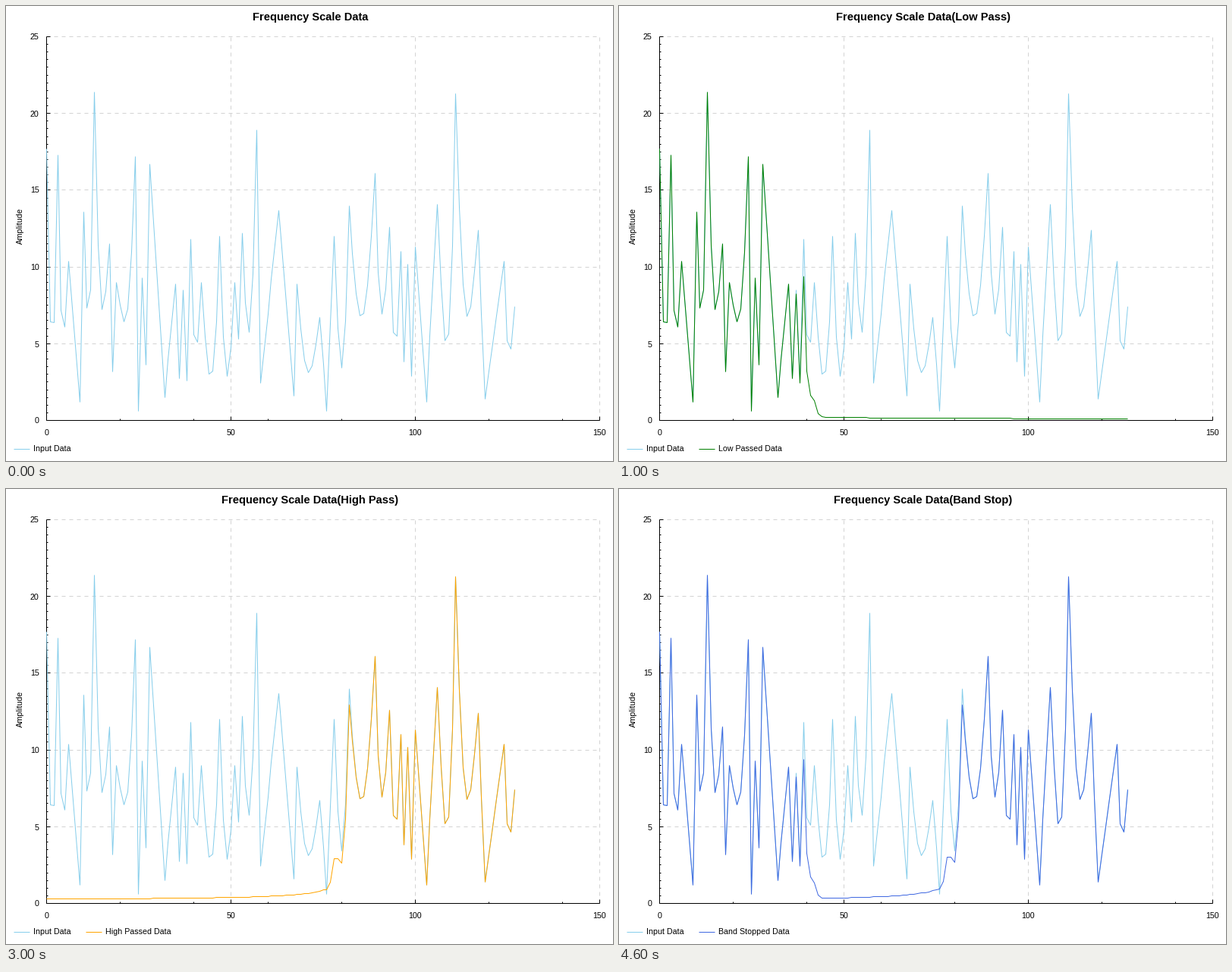
Write a matplotlib script that moves like this. It is 800x600 px and loops after 5 s.

```python
import numpy as np
import matplotlib.pyplot as plt
from matplotlib.animation import FuncAnimation

W, H, DPI = 800, 600, 100
PX = 72 / DPI
LEFT, RIGHT, TOP, BOTTOM = 53, 782, 40, 546
plt.rcParams["font.family"] = "Liberation Sans"

n = np.arange(128)
# Main peaks and dips of the spectrum
KEYS = {0: 17.7, 3: 17.3, 6: 10.4, 9: 1.2, 10: 13.6, 13: 21.4, 17: 11.5, 19: 9, 24: 17.2,
        25: .6, 26: 9.3, 28: 16.7, 32: 1.5, 35: 8.9, 37: 8.5, 39: 11.8, 42: 9, 47: 12, 51: 9,
        53: 12.2, 57: 18.9, 58: 2.4, 63: 13.7, 67: 1.6, 68: 8.9, 74: 6.7, 76: .6, 78: 12,
        82: 14, 89: 16.1, 93: 12.6, 96: 11, 98: 10.2, 100: 11.3, 103: 1.2, 106: 14.1,
        111: 21.3, 117: 12.4, 119: 1.4, 124: 10.4, 127: 7.4}


def spectrum():
    """Join the key points, with a valley of random depth between two peaks."""
    rng = np.random.default_rng(4)
    xs, ys = np.array(list(KEYS)), np.array(list(KEYS.values()))
    seg = np.clip(np.searchsorted(xs, n, "right") - 1, 0, len(xs) - 2)
    t = (n - xs[seg]) / (xs[seg + 1] - xs[seg])
    depth = rng.uniform(.45, .75, len(xs)) * (np.minimum(ys, np.roll(ys, -1)) > 5)
    return np.interp(n, xs, ys) * (1 - depth[seg] * np.sin(np.pi * t))


def rise(centre, width):
    return 1 / (1 + np.exp((centre - n) / width))


def leak(pole, scale, base):
    return base + scale / np.maximum(np.abs(n - pole), 5)


def filtered(gain, floor):
    return gain * signal + (1 - gain) * floor


signal = spectrum()
low = 1 - rise(40.2, .9)
band = rise(39.8, 1.2) * (1 - rise(79.9, 1))
high = rise(79.6, 1)
band_floor = np.where(n < 60, leak(50, 9.63, -.16), leak(80, 4, .35))

VIEWS = [
    ("", "", "none", signal),
    ("(Low Pass)", "Low Passed Data", "green", filtered(low, leak(0, 7, .05))),
    ("(Band Pass)", "Band Passed Data", "purple", filtered(band, band_floor)),
    ("(High Pass)", "High Passed Data", "orange", filtered(high, leak(85, 6.27, .21))),
    ("(Band Stop)", "Band Stopped Data", "royalblue",
     filtered(low + high, leak(85, 7.2, .155))),
]

fig = plt.figure(figsize=(W / DPI, H / DPI), dpi=DPI, facecolor="white")
ax = fig.add_axes([0, 0, 1, 1])
ax.set_xlim(0, W)
ax.set_ylim(H, 0)
ax.axis("off")


def to_x(v):
    return np.round(LEFT + v * (RIGHT - LEFT) / 150)


def to_y(v):
    return np.round(BOTTOM - v * (BOTTOM - TOP) / 25)


def line(xs, ys, color, **kw):
    # Half-pixel centres keep one-pixel lines crisp without snapping
    return ax.plot(np.asarray(xs) + .5, np.asarray(ys) + .5, color=color, lw=PX,
                   snap=False, solid_capstyle="butt", solid_joinstyle="bevel", **kw)[0]


def label(x, y, s, size=10.67, **kw):
    return ax.text(x, y, s, fontsize=size * PX, color="black", **kw)


dash = dict(linestyle=(0, (5, 5)), dash_capstyle="butt", zorder=1)
for v in range(0, 151, 50):
    x = to_x(v)
    if v:
        line([x, x], [BOTTOM, TOP], "lightgray", **dash)
    line([x, x], [BOTTOM, BOTTOM - 5], "black", zorder=3)
    label(x + .5, 566.5, str(v), ha="center")
for v in range(0, 26, 5):
    y = to_y(v)
    if v:
        line([LEFT, RIGHT], [y, y], "lightgray", **dash)
    line([LEFT, LEFT + 5], [y, y], "black", zorder=3)
    label(43.5, y + 4.5, str(v), ha="right")
for v in range(20, 150, 20):
    line([to_x(v)] * 2, [BOTTOM, BOTTOM - 2], "black", zorder=3)
for v in np.arange(.5, 25, .5):
    line([LEFT, LEFT + 2], [to_y(v)] * 2, "black", zorder=3)
line([LEFT, LEFT], [TOP, BOTTOM], "black", zorder=3)
line([LEFT, RIGHT], [BOTTOM, BOTTOM], "black", zorder=3)

label(24, 290.5, "Amplitude", rotation=90, ha="right", va="center")
line(to_x(n), to_y(signal), "skyblue", zorder=4)
line([10, 31], [584, 584], "skyblue")
label(36, 587, "Input Data")

title = label(401, 19, "", 14.67, weight="bold", ha="center")
curve = line(to_x(n), to_y(signal), "none", zorder=5)
key = line([105, 126], [584, 584], "none")
key_text = label(131, 587, "")


def draw(i):
    suffix, name, color, data = VIEWS[i]
    title.set_text("Frequency Scale Data" + suffix)
    curve.set_ydata(to_y(data) + .5)
    curve.set_color(color)
    key.set_color(color)
    key_text.set_text(name)
    return title, curve, key, key_text


anim = FuncAnimation(fig, draw, frames=len(VIEWS), interval=1000, repeat=True, repeat_delay=0)
plt.show()
```
